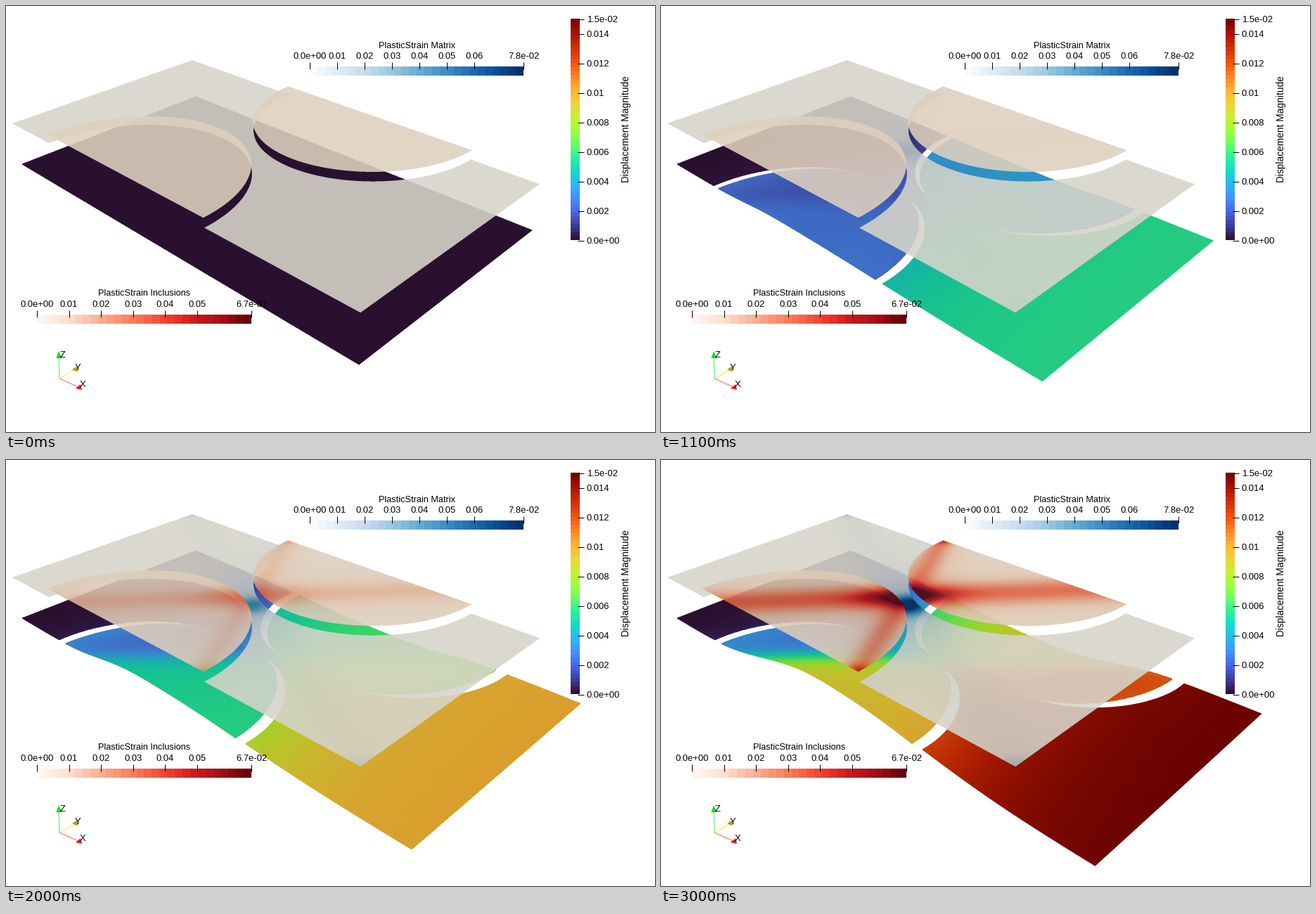
Write a matplotlib script that moves like this. It is 923 px wide and 606 px high and loops after 3.1 s.

```python
import numpy as np
import matplotlib.pyplot as plt
from matplotlib.animation import FuncAnimation
from matplotlib.colors import ListedColormap

W, H = 923, 606
FRAMES, STEP = 31, 100
PT = 0.72                                  # points per pixel at 100 dpi
R, LEFT, RIGHT = 0.5, 0.8, 1.2             # inclusion radius and centres
TINT = np.array([0.874, 0.85, 0.796])      # warm light on the plates
ALPHA = 0.893

plt.rcParams["font.family"] = "Liberation Sans"
fig = plt.figure(figsize=(W / 100, H / 100), dpi=100, facecolor="white")
ax = fig.add_axes([0, 0, 1, 1])
ax.set_xlim(0, W)
ax.set_ylim(H, 0)
ax.axis("off")
ax.set_autoscale_on(False)


def lit(name):
    colors = plt.get_cmap(name)(np.linspace(0, 1, 256))[:, :3]
    return ListedColormap(colors * TINT)


TURBO, BLUES, REDS = lit("turbo"), lit("Blues"), lit("Reds")


# --- camera: the plate is 2 x 1, z is the height of the layer ---
def camera(z):
    return np.array([[157.25, 293.1, 23 - 14.28 * z],
                     [58.95, -74.0, 225 - 63.2 * z],
                     [-0.1638, 0.1707, 1 - 0.0312 * z]])


def project(x, y, z=0):
    m = camera(z)
    px, py, pw = (row[0] * x + row[1] * y + row[2] for row in m)
    return px / pw, py / pw


def unproject(z, sub=1):
    px, py = np.meshgrid((np.arange(W * sub) + 0.5) / sub,
                         (np.arange(H * sub) + 0.5) / sub)
    m = np.linalg.inv(camera(z))
    x, y, w = (row[0] * px + row[1] * py + row[2] for row in m)
    return x / w, y / w


# --- shapes ---
def in_plate(x, y):
    return (x >= 0) & (x <= 2) & (y >= 0) & (y <= 1)


def in_discs(x, y):
    low = (x - LEFT) ** 2 + y ** 2 < R ** 2
    high = (x - RIGHT) ** 2 + (1 - y) ** 2 < R ** 2
    return low | high


def coverage(z, inside, sub=3):
    mask = inside(*unproject(z, sub)).astype(float)
    return mask.reshape(H, sub, W, sub).mean(axis=(1, 3))


def arc(x, centre):
    return np.sqrt(np.clip(R ** 2 - (x - centre) ** 2, 0, None))


def grid(x, bottom, top, rows):
    k = np.linspace(0, 1, rows)[:, None]
    return np.broadcast_to(x, (rows, x.size)), bottom + k * (top - bottom)


bow = -R * np.cos(np.linspace(0, np.pi, 45))
columns = np.unique(np.round(np.concatenate(
    [np.linspace(0, 0.3, 10), LEFT + bow, RIGHT + bow, np.linspace(1.7, 2, 10)]), 6))
BODIES = [
    (None, grid(columns, arc(columns, LEFT), 1 - arc(columns, RIGHT), 18)),
    (LEFT, grid(LEFT + bow, 0, arc(LEFT + bow, LEFT), 18)),
    (RIGHT, grid(RIGHT + bow, 1 - arc(RIGHT + bow, RIGHT), 1, 18)),
]


# --- deformation ---
def band_coords(x, y):
    """Signed distances from the two slip lines through the neck."""
    dx, dy = x - 1, y - 0.5
    return (dx - dy) / np.sqrt(2), 0.857 * dx + 0.5145 * dy


def step(s, width):
    return 0.5 * (1 + np.tanh(s / width))


def displacement(x, y, centre, t):
    total = 0.3 * t / 30
    slip = 0.11 * (t / 30) ** 1.7
    opening = 0.054 * (1 - np.exp(-(t / 9.3) ** 2))
    s1, s2 = band_coords(x, y)
    h1, h2 = step(s1, 0.09), step(s2, 0.35)
    ramp = 0.5 * (1 + np.tanh(2.2 * (x - 1)) / np.tanh(2.2))
    dx = (total - 1.6 * slip) * ramp + slip * h1 + 0.6 * slip * h2
    dy = slip * (h1 - h2)
    if centre is not None:
        depth = (y if centre == LEFT else 1 - y) / R
        dx = dx - opening * (x - centre) / R * (1 + 0.3 * depth)
    return dx, dy


# --- plastic strain, scaled to 0..1 ---
def bell(s, width):
    return np.exp(-(s / width) ** 2)


def spots(x, y, cx, cy, width):
    return (bell(np.hypot(x - cx, y - cy), width)
            + bell(np.hypot(x - 2 + cx, y - 1 + cy), width))


def inclusion_strain(x, y):
    s1, s2 = band_coords(x, y)
    r = np.hypot(x - 1, y - 0.5)
    return (bell(s1, 0.1) * (0.36 + 0.5 * bell(r, 0.2)) + 0.12 * bell(s1, 0.24)
            + bell(s2, 0.055) * 0.26 + 0.12 * bell(s2, 0.14)
            + 0.35 * spots(x, y, 1.3, 0, 0.05))


def matrix_strain(x, y):
    s2 = band_coords(x, y)[1]
    r = np.hypot(x - 1, y - 0.5)
    diagonal = ((x - 1) + 2 * (y - 0.5)) / np.sqrt(5)
    return (0.85 * bell(r, 0.085) + 0.2 * bell(r, 0.25) + 0.05 * bell(s2, 0.15)
            + 0.05 * bell(diagonal, 0.12) + 0.18 * spots(x, y, 2, 0, 0.05))


class Sheet:
    """A flat translucent layer coloured by its strain."""

    def __init__(self, z, inside, strain, cmap, start, power, zorder):
        self.field = strain(*unproject(z))
        self.cmap, self.start, self.power = cmap, start, power
        self.alpha = ALPHA * coverage(z, inside)
        self.image = ax.imshow(np.zeros((H, W, 4)), extent=(0, W, H, 0), aspect="auto",
                               interpolation="nearest", zorder=zorder)

    def update(self, t):
        grow = max(0, (t - self.start) / (30 - self.start)) ** self.power
        rgba = self.cmap(np.clip(self.field * grow, 0, 1))
        rgba[..., 3] = self.alpha
        self.image.set_data(rgba)


sheets = [
    Sheet(1.0, lambda x, y: in_plate(x, y) & ~in_discs(x, y),
          matrix_strain, BLUES, 6, 1.1, 2),
    Sheet(1.2, lambda x, y: in_plate(x, y) & in_discs(x, y),
          inclusion_strain, REDS, 10, 1.4, 3),
]


# --- legends ---
def label(x, y, text, size=13, **kw):
    kw = {"ha": "center", "va": "center_baseline", **kw}
    ax.text(x, y, text, fontsize=size * PT, color="black", zorder=6, **kw)


def line(x, y, color="black", width=1):
    ax.plot(x, y, color=color, lw=width * PT, zorder=5, solid_capstyle="butt")


def bar(name, blocks, extent, vertical=False):
    ramp = np.linspace(0, 1, blocks)
    data = ramp[::-1, None] if vertical else ramp[None, :]
    ax.imshow(data, cmap=name, extent=extent, aspect="auto",
              interpolation="nearest", zorder=4)


def flat_legend(name, title, x0, x1, y, gap, count, last):
    bar(name, 28, (x0, x1, y + 13, y))
    label((x0 + x1) / 2, y - 31, title, 12.8)
    marks = [(x0, "0.0e+00")]
    marks += [(x0 + gap * k, f"0.0{k}") for k in range(1, count + 1)]
    for x, text in marks + [(x1, last)]:
        line([x, x], [y - 6, y + 4])
        label(x, y - 15.5, text)


flat_legend("Blues", "PlasticStrain Matrix", 432, 736, 86, 39, 6, "7.8e-02")
flat_legend("Reds", "PlasticStrain Inclusions", 44, 349, 439, 45.6, 5, "6.7e-02")

bar("turbo", 55, (803, 816, 333.5, 18.5), vertical=True)
marks = [(0, "0.0e+00"), (15, "1.5e-02")]
marks += [(k, f"{k / 1000:g}") for k in range(2, 15, 2)]
for k, text in marks:
    y = 333.5 - 21 * k
    line([813, 822], [y, y])
    label(826, y, text, ha="left")
label(882, 175.5, "Displacement Magnitude", 13.8, rotation=90, va="center")


# --- axis triad ---
def cone(tip, base, half, color):
    tip, base = np.array(tip), np.array(base)
    d = (tip - base) / np.hypot(*(tip - base))
    side = half * np.array([-d[1], d[0]])
    ax.fill(*np.array([tip, base + side, base - side]).T, color=color, lw=0, zorder=5)


for end, tip, base, shade, solid in [
        ((75, 499), (75, 491), (75.3, 501), "#5cf08c", "#12e022"),
        ((97, 518), (94, 517), (101.5, 516.5), "#f2ee58", "#a8a012"),
        ((103, 542), (99, 544), (107, 542), "#ff7a66", "#e01818")]:
    line([76, end[0]], [530, end[1]], shade, 1.2)
    cone(tip, base, 4, solid)
for x, y, name in [(81, 495.5, "Z"), (102, 514, "Y"), (109, 538, "X")]:
    label(x, y, name)

plates = []


def draw(t):
    while plates:
        plates.pop().remove()
    for centre, (x, y) in BODIES:
        dx, dy = displacement(x, y, centre, t)
        px, py = project(x + dx, y + dy)
        plates.append(ax.pcolormesh(px, py, np.hypot(dx, dy) / 0.3, cmap=TURBO,
                                    vmin=0, vmax=1, shading="gouraud", zorder=1))
    for sheet in sheets:
        sheet.update(t)
    return []


anim = FuncAnimation(fig, draw, frames=FRAMES, interval=STEP, init_func=lambda: [],
                     repeat=True, repeat_delay=0, blit=False)
plt.show()
```
